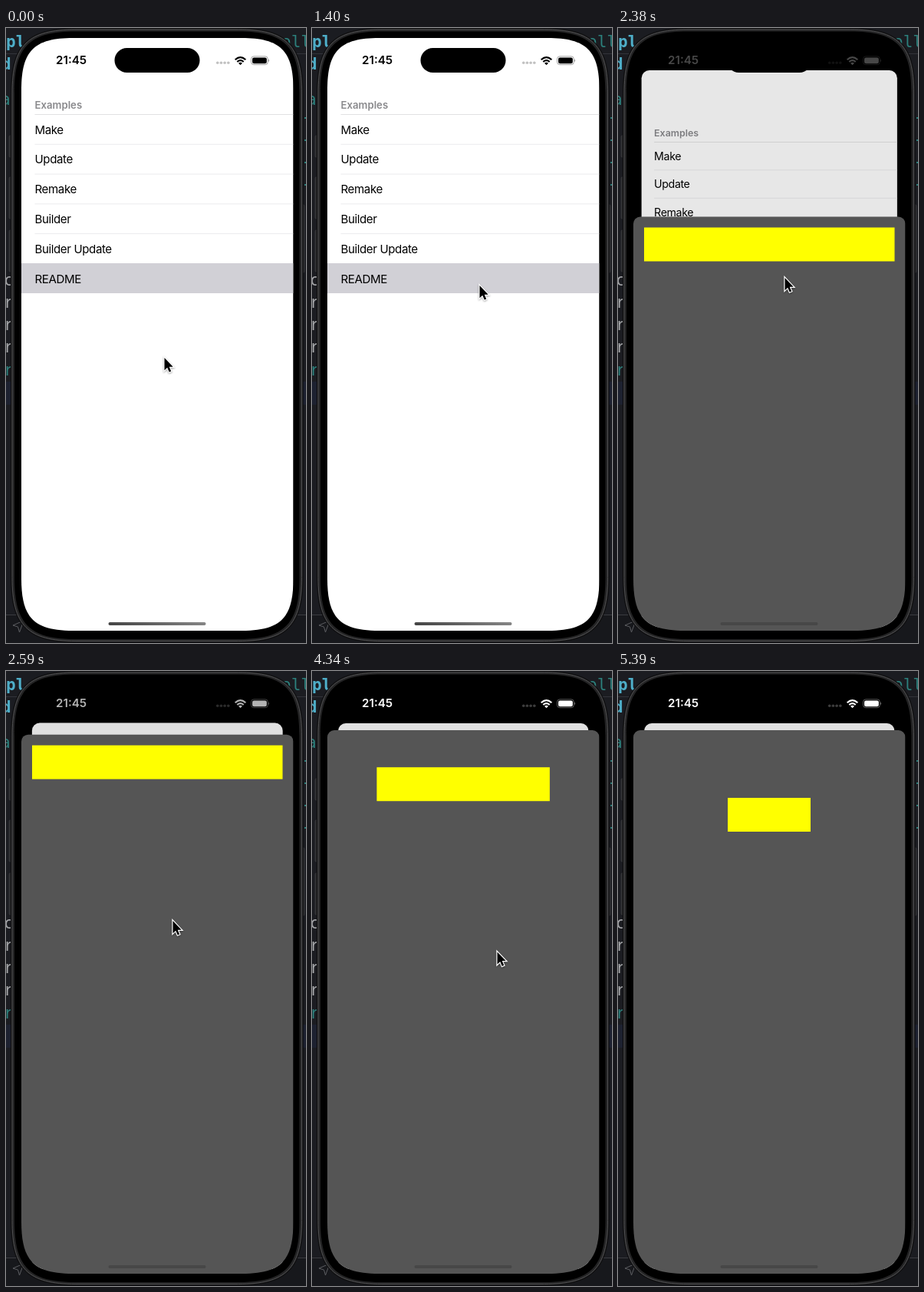
Write an HTML page that moves like this. It is 391x800 px and loops after 6.23 s.

```html
<!DOCTYPE html>
<html lang="en">
<head>
<meta charset="utf-8">
<title>Sheet demo</title>
<style>
  html, body { margin: 0; width: 100%; height: 100%; overflow: hidden; background: #1b1c21; }
  svg { display: block; width: 100%; height: 100%; }
  text { font-family: Inter, "Liberation Sans", sans-serif; }
  .code text { font: 21px "DejaVu Sans Mono", monospace; }
  .code .bold { font-weight: 700; }
  .row { font-size: 15.1px; letter-spacing: -.4px; }
  #cursor { filter: drop-shadow(0 1px 1px rgba(0, 0, 0, .35)); }
</style>
</head>
<body>
<svg viewBox="0 0 391 800">
  <defs>
    <clipPath id="screen"><path id="glass"/></clipPath>
    <linearGradient id="bar">
      <stop offset="0" stop-color="#444"/>
      <stop offset="1" stop-color="#858585"/>
    </linearGradient>
  </defs>

  <!-- editor behind the phone -->
  <rect width="391" height="800" fill="#1b1c21"/>
  <rect y="33" width="391" height="1" fill="#33343a"/>
  <rect y="460" width="391" height="30" fill="#1d2130"/>
  <rect y="763" width="391" height="1" fill="#3a3b40"/>
  <rect y="764" width="391" height="36" fill="#17181c"/>
  <g class="code" id="code"></g>
  <path d="M9 777L23 771L17.500 786L15.500 779Z" fill="none" stroke="#5c5d61"/>

  <!-- phone body -->
  <g fill="#2c2c2e" stroke="#414144" stroke-width=".6">
    <rect x="4" y="140" width="5" height="28" rx="1.500"/>
    <rect x="4" y="194" width="5" height="54" rx="1.500"/>
    <rect x="4" y="263" width="5" height="54" rx="1.500"/>
    <rect x="384" y="230" width="5" height="88" rx="1.500"/>
  </g>
  <path id="shell" fill="#1f1f20" stroke="#0d0d0e"/>
  <path id="rim" fill="#242425" stroke="#505052"/>
  <path id="bezel"/>

  <g clip-path="url(#screen)">
    <rect x="19" y="12" width="357" height="773"/>
    <g id="list">
      <rect id="page" width="354.500" height="771" rx="11" fill="#fff"/>
      <text x="17.500" y="91.500" font-size="13.200" font-weight="600" fill="#89898c">Examples</text>
      <g id="rows"></g>
      <rect id="dim" width="354.500" height="771" rx="11"/>
    </g>
    <g id="sheet">
      <rect x="20" width="354.500" height="800" rx="9" fill="#555"/>
      <rect id="box" height="44" fill="#ff0"/>
    </g>
    <rect id="home" x="133.500" y="773" width="127" height="4" rx="2"/>
  </g>

  <rect x="141.500" y="26" width="111" height="32" rx="16"/>
  <g id="status">
    <text x="65" y="47.300" font-size="15.200" font-weight="600">21:45</text>
    <g opacity=".24" id="dots"></g>
    <path d="M298.700 41.200Q305.500 35.200 312.300 41.200M301.300 44Q305.500 40.400 309.700 44" fill="none" stroke="currentColor" stroke-width="2.200"/>
    <path d="M303 45.700Q305.500 43.800 308 45.700L305.500 48.200Z"/>
    <rect x="319.500" y="36.900" width="21.800" height="10.800" rx="3.400" fill="none" stroke="currentColor" stroke-width=".9" opacity=".4"/>
    <rect x="321" y="38.400" width="18.800" height="7.800" rx="2.200"/>
    <path d="M342.200 40.500Q344.200 42.300 342.200 44.100Z" opacity=".45"/>
  </g>

  <path id="cursor" d="M.5 1V17.200L4.200 13.700L6.700 19.500L9.200 18.400L6.700 12.700H11.700Z"
    stroke="#fff" stroke-width="2.400" paint-order="stroke"/>
</svg>

<script>
const LOOP = 6230, STEP = 70;
const $ = id => document.getElementById(id);
const set = (el, attrs) => { for (const k in attrs) el.setAttribute(k, attrs[k]); return el; };
const add = (parent, tag, attrs, text = "") => {
  const el = set(document.createElementNS("http://www.w3.org/2000/svg", tag), attrs);
  el.textContent = text;
  parent.append(el);
};

const clamp = v => Math.min(1, Math.max(0, v));
const mix = (a, b, p) => a + (b - a) * p;
const ease = p => p * p * (3 - 2 * p);

// Critically damped spring, t in ms
const spring = t => {
  const w = Math.max(0, t) * 0.0197;
  return 1 - (1 + w) * Math.exp(-w);
};

// Rectangle with smooth, continuous corners
function squircle(x, y, w, h, r) {
  const e = 1.35 * r, k = .245 * e, f = e - k;
  return `M${x + e} ${y}h${w - 2 * e}c${f} 0 ${e} ${k} ${e} ${e}v${h - 2 * e}c0 ${f} ${-k} ${e} ${-e} ${e}`
    + `h${2 * e - w}c${-f} 0 ${-e} ${-k} ${-e} ${-e}v${2 * e - h}c0 ${-f} ${k} ${-e} ${e} ${-e}z`;
}
set($("glass"), { d: squircle(20, 13, 354.5, 771, 50) });
set($("bezel"), { d: squircle(11, 4.5, 371.5, 790.5, 59) });
set($("rim"), { d: squircle(8, 2, 377.5, 795.5, 61.5) });
set($("shell"), { d: squircle(6.5, .5, 380.5, 798.5, 63) });

["Make", "Update", "Remake", "Builder", "Builder Update", "README"].forEach((name, i) => {
  const y = 99.5 + i * 38.8;
  if (name === "README") add($("rows"), "rect", { y: y - .5, width: 354.5, height: 39, fill: "#d1d0d6" });
  else add($("rows"), "rect", { x: 17.5, y: y - .5, width: 337, height: .9, fill: i ? "#e9e9eb" : "#dedee0" });
  add($("rows"), "text", { class: "row", x: 17.5, y: y + 25 }, name);
});

const CYAN = "#4eaec8", TEAL = "#2c7f7b", GRAY = "#a4a5a8";
[["pl", 0, 25, CYAN, "bold"], ["d", -6, 54, CYAN, "bold"], ["a", -7, 100, TEAL], ["oll", 359, 25, TEAL],
 ["c", -3, 335, GRAY], ["r", -3, 364, GRAY], ["r", -3, 393, GRAY], ["r", -3, 422, GRAY], ["r", -3, 452, TEAL]
].forEach(([s, x, y, fill, type = ""]) => add($("code"), "text", { x, y, fill, class: type }, s));
for (let i = 0; i < 4; i++) {
  add($("code"), "rect", { x: 389, y: 116 + i * 29, width: 2, height: 2, fill: TEAL });
  add($("dots"), "circle", { cx: 275.7 + i * 4.7, cy: 45.3, r: 1.8 });
}

// Pointer stops: time, x, y
const stops = [
  [0, 206, 428], [560, 211, 392], [770, 211, 392], [1330, 217, 335], [1400, 218, 334],
  [1540, 218, 334], [1680, 218, 332], [1960, 218, 332], [2240, 217, 324], [2590, 217, 324],
  [3010, 241, 363], [3150, 241, 363], [3220, 241, 364], [4200, 241, 364], [4690, 241, 366],
  [4830, 241, 366], [5110, 182, 445], [5390, -20, 820]
];
function pointer(t) {
  const i = stops.findIndex(s => s[0] > t);
  if (i < 0) return stops.at(-1).slice(1);
  const [t0, x0, y0] = stops[i - 1], [t1, x1, y1] = stops[i];
  const p = ease((t - t0) / (t1 - t0));
  return [mix(x0, x1, p), mix(y0, y1, p)];
}

function draw(t) {
  const open = spring(t - 2240);
  const scale = 1 - 28 * open / 354.5;
  set($("list"), { transform: `translate(${20 + 14 * open} ${13 + 55 * open}) scale(${scale})` });
  set($("dim"), { opacity: .123 * open });
  set($("sheet"), { transform: `translate(0 ${mix(784, 77, open)})` });

  const move = ease(clamp((t - 4150) / 400));
  set($("box"), { x: mix(34, 143, move), y: mix(14, 88, move), width: mix(326.5, 108, move) });

  const v = Math.round(255 * clamp((t - 2240) / 500));
  const tone = `rgb(${v},${v},${v})`;
  set($("status"), { fill: tone, color: tone });
  set($("home"), { fill: open > .3 ? "#474747" : "url(#bar)" });

  set($("cursor"), { transform: `translate(${pointer(t).join(" ")})` });
}

const start = performance.now();
function tick() {
  const t = (performance.now() - start) % LOOP;
  draw(Math.floor(t / STEP) * STEP);
  requestAnimationFrame(tick);
}
tick();
</script>
</body>
</html>
```
